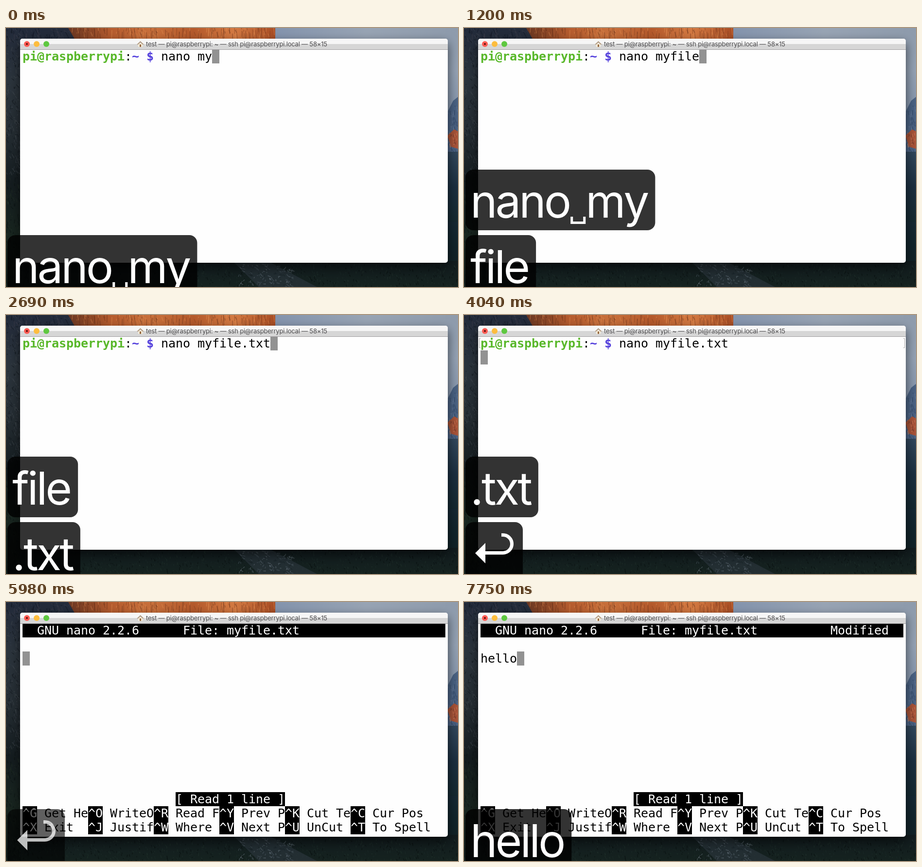
An HTML page with a canvas for the animation above (8 s loop, 930 by 534 pixels).

```html
<!DOCTYPE html>
<html lang="en">
<head>
<meta charset="utf-8">
<title>Terminal session</title>
<style>
html, body { margin: 0; width: 100%; height: 100%; overflow: hidden; background: #10191c; }
canvas { display: block; }
</style>
</head>
<body>
<canvas id="stage" width="930" height="534"></canvas>
<script>
const W = 930, H = 534, LOOP = 8000;
const CELL = 15, LINE = 29, LEFT = 34, TOP = 44;
const MONO = '25px "DejaVu Sans Mono", monospace';
const ctx = document.getElementById('stage').getContext('2d');
const backdrop = document.createElement('canvas');
backdrop.width = W;
backdrop.height = H;

function box(c, x, y, w, h, r, fill) {
  c.fillStyle = fill;
  c.beginPath();
  c.roundRect(x, y, w, h, r);
  c.fill();
}

function shape(c, fill, ...points) {
  c.fillStyle = fill;
  c.beginPath();
  for (let i = 0; i < points.length; i += 2) c.lineTo(points[i], points[i + 1]);
  c.fill();
}

function fade(c, x0, y0, x1, y1, ...colors) {
  const g = c.createLinearGradient(x0, y0, x1, y1);
  colors.forEach((color, i) => g.addColorStop(i / (colors.length - 1), color));
  return g;
}

let seed = 7;
const rnd = () => (seed = seed * 16807 % 2147483647) / 2147483647;

// Short random strokes that roughen a rocky or wooded area
function grain(c, x, y, w, h, count, dx, dy, colors) {
  c.lineWidth = 1.5;
  for (let i = 0; i < count; i++) {
    const px = x + rnd() * w, py = y + rnd() * h;
    c.strokeStyle = colors[Math.floor(rnd() * colors.length)];
    c.beginPath();
    c.moveTo(px, py);
    c.lineTo(px + (rnd() - 0.3) * dx, py + rnd() * dy);
    c.stroke();
  }
}

function paintLandscape(c) {
  c.fillStyle = fade(c, 0, 0, 0, H, '#222a3a', '#2b343c', '#252d33', '#141c1f', '#18251f', '#101a18');
  c.fillRect(0, 0, W, H);
  grain(c, 0, 0, 30, 300, 200, 9, 9, ['#39424a66', '#10161d88', '#4a525866']);
  grain(c, 0, 300, 30, 234, 160, 5, 9, ['#0a101188', '#27372b66']);
  grain(c, 0, 0, 140, 24, 90, 10, 14, ['#3b435255', '#12182588', '#4a465055']);

  shape(c, fade(c, 133, 0, 554, 0, '#6d3822', '#b65c2e', '#c9703b', '#b4592b', '#d47a42', '#a84d24'),
    128, 0, 554, 0, 554, 24, 142, 24);
  grain(c, 136, -8, 416, 20, 170, 5, 24, ['#5c2a1766', '#e8955866', '#7d3b1d66']);
  c.fillStyle = fade(c, 554, 0, W, 0, '#8494ad', '#98a4b4', '#8e9bac');
  c.fillRect(554, 0, W - 554, 24);

  c.fillStyle = fade(c, 0, 0, 0, H, '#8e9bac', '#94a2b4', '#8393aa', '#24364c', '#192c3c', '#11242b', '#111e1f');
  c.fillRect(905, 0, 25, H);
  shape(c, '#4a6283', 905, 180, 920, 150, 930, 142, 930, 290, 905, 290);
  grain(c, 905, 160, 25, 130, 80, 4, 12, ['#7388a466', '#2b425f88']);
  shape(c, '#a95438', 908, 222, 922, 209, 930, 213, 930, 249, 916, 245);
  grain(c, 910, 215, 18, 25, 20, 4, 8, ['#d6825c88', '#6f382c88']);
  c.fillStyle = fade(c, 0, 255, 0, 400, '#31475c', '#1b2f40', '#142830');
  c.fillRect(905, 255, 25, 145);

  c.fillStyle = fade(c, 0, 480, 0, H, '#111b1e', '#15221f');
  c.fillRect(30, 480, 900, 54);
  grain(c, 0, 484, W, 50, 900, 4, 6, ['#070d0e88', '#25362f77', '#1c2c2a88']);
  shape(c, '#2b353daa', 470, 484, 545, 484, 640, 534, 520, 534);
  grain(c, 480, 486, 110, 46, 130, 10, 5, ['#5d697566', '#7b869066', '#151e2288']);
}

function paintWindow(c) {
  c.save();
  c.shadowColor = '#0009';
  c.shadowBlur = 22;
  c.shadowOffsetY = 9;
  box(c, 29, 22, 880, 462, 5, '#fefefe');
  c.restore();
  box(c, 29, 22, 880, 22, [5, 5, 0, 0], '#f6f6f6');
  c.fillStyle = '#d6d6d6';
  c.fillRect(29, 33, 880, 11);
  c.fillStyle = '#a09da0';
  c.fillRect(29, 44, 880, 1);
  ['#fc5b53', '#fdbd3e', '#5ec840'].forEach((color, i) => box(c, 37 + 20 * i, 27, 12, 12, 6, color));
  box(c, 41, 31, 4, 4, 2, '#5a0f0c');

  box(c, 272, 32, 9, 7, 1, '#f3ead5');
  shape(c, '#b29c83', 269, 34, 276.5, 27, 284, 34, 281, 34, 276.5, 30, 272, 34);
  c.fillStyle = '#94673f';
  c.fillRect(275, 34, 3, 5);
  c.fillStyle = '#4b4a4c';
  c.font = '13px Inter, sans-serif';
  c.letterSpacing = '-0.2px';
  c.fillText('test — pi@raspberrypi: ~ — ssh pi@raspberrypi.local — 58×15', 288, 38);
}

function print(text, col, row, color = '#000', weight = '') {
  ctx.font = weight + ' ' + MONO;
  ctx.fillStyle = color;
  [...text].forEach((ch, i) => ctx.fillText(ch, LEFT + CELL * (col + i), TOP + LINE * row + 23));
}

function bar(col, row, cells, color = '#000') {
  const inset = row ? 0 : 1;
  ctx.fillStyle = color;
  ctx.fillRect(LEFT + CELL * col, TOP + LINE * row + inset, CELL * cells, LINE - inset);
}

function inverse(text, col, row) {
  bar(col, row, text.length);
  print(text, col, row, '#fff');
}

const cursor = (col, row) => bar(col, row, 1, '#929292');
const typed = (text, times, t) => text.slice(0, times.filter(at => at <= t).length);

const COMMAND = 'nano myfile.txt';
const COMMAND_KEYS = [...Array(7).fill(0), 750, 900, 1050, 1200, 2090, 2390, 2540, 2690];
const HELLO_KEYS = [7020, 7170, 7310, 7460, 7750];

function drawShell(t) {
  print('pi@raspberrypi', 0, 0, '#59b82a', 'bold');
  print(':', 14, 0);
  print('~ $', 15, 0, '#5440dc', 'bold');
  const line = typed(COMMAND, COMMAND_KEYS, t);
  print(line, 19, 0);
  if (t < 4040) return cursor(19 + line.length, 0);
  cursor(0, 1);
  ctx.strokeStyle = '#aaa';
  ctx.lineWidth = 1;
  ctx.stroke(new Path2D('M34 48.5H31.5V67.5H34M904 48.5H906.5V67.5H904'));
}

const MENU = [
  ['G Get He', 'O WriteO', 'R Read F', 'Y Prev P', 'K Cut Te', 'C Cur Pos'],
  ['X Exit', 'J Justif', 'W Where', 'V Next P', 'U UnCut', 'T To Spell']
];

function drawEditor(t) {
  const line = typed('hello', HELLO_KEYS, t);
  inverse('  GNU nano 2.2.6      File: myfile.txt'.padEnd(48) + (line ? 'Modified  ' : ' '.repeat(10)), 0, 0);
  print(line, 0, 2);
  cursor(line.length, 2);
  inverse('[ Read 1 line ]', 21, 12);
  MENU.forEach((items, r) => items.forEach((item, i) => {
    inverse('^' + item[0], 9 * i, 13 + r);
    print(item.slice(2), 9 * i + 3, 13 + r);
  }));
}

// Key bubbles: text, key times, start of fading, removal
const BUBBLES = [
  ['nano␣my', Array(7).fill(0), 1940, 2090],
  ['file', [750, 900, 1050, 1200], 3140, 3290],
  ['.txt', [1940, 2390, 2540, 2690], 4640, 4780],
  ['↩', [4040], 5980, 6120],
  ['hello', HELLO_KEYS, LOOP, LOOP]
];
const TRACK = -4;

function drawBubble(text, y, faded) {
  ctx.font = '94px Inter, sans-serif';
  const wide = ch => ch === '␣' ? 33 : ch === '↩' ? 92 : ctx.measureText(ch).width + TRACK;
  const width = [...text].reduce((sum, ch) => sum + wide(ch), 26);
  box(ctx, 3, y, width, 125, 16, faded ? 'rgba(0,0,0,.62)' : 'rgba(0,0,0,.8)');
  ctx.fillStyle = ctx.strokeStyle = faded ? 'rgba(255,255,255,.74)' : '#fff';
  let x = 13;
  for (const ch of text) {
    ctx.save();
    ctx.translate(x, y);
    if (ch === '␣') {
      ctx.lineWidth = 5;
      ctx.stroke(new Path2D('M4.5 97V109.5H30.5V97'));
    } else if (ch === '↩') {
      ctx.lineWidth = 7;
      ctx.stroke(new Path2D('M64 26.5h3a18.5 18.5 0 0 1 0 37H31'));
      ctx.fill(new Path2D('M10 64L31 43V85Z'));
    } else {
      ctx.fillText(ch, 0, 99);
    }
    ctx.restore();
    x += wide(ch);
  }
}

function drawBubbles(t) {
  const begun = BUBBLES.filter(b => b[1][0] <= t);
  begun.forEach(([text, keys, fadeAt, goneAt], i) => {
    if (t < goneAt) drawBubble(typed(text, keys, t), 427 - 135 * (begun.length - 1 - i), t >= fadeAt);
  });
}

function frame(now) {
  const t = now % LOOP;
  ctx.drawImage(backdrop, 0, 0);
  (t < 4190 ? drawShell : drawEditor)(t);
  drawBubbles(t);
  requestAnimationFrame(frame);
}

paintLandscape(backdrop.getContext('2d'));
paintWindow(backdrop.getContext('2d'));
const start = performance.now();
requestAnimationFrame(now => frame(Math.max(0, now - start)));
</script>
</body>
</html>
```
